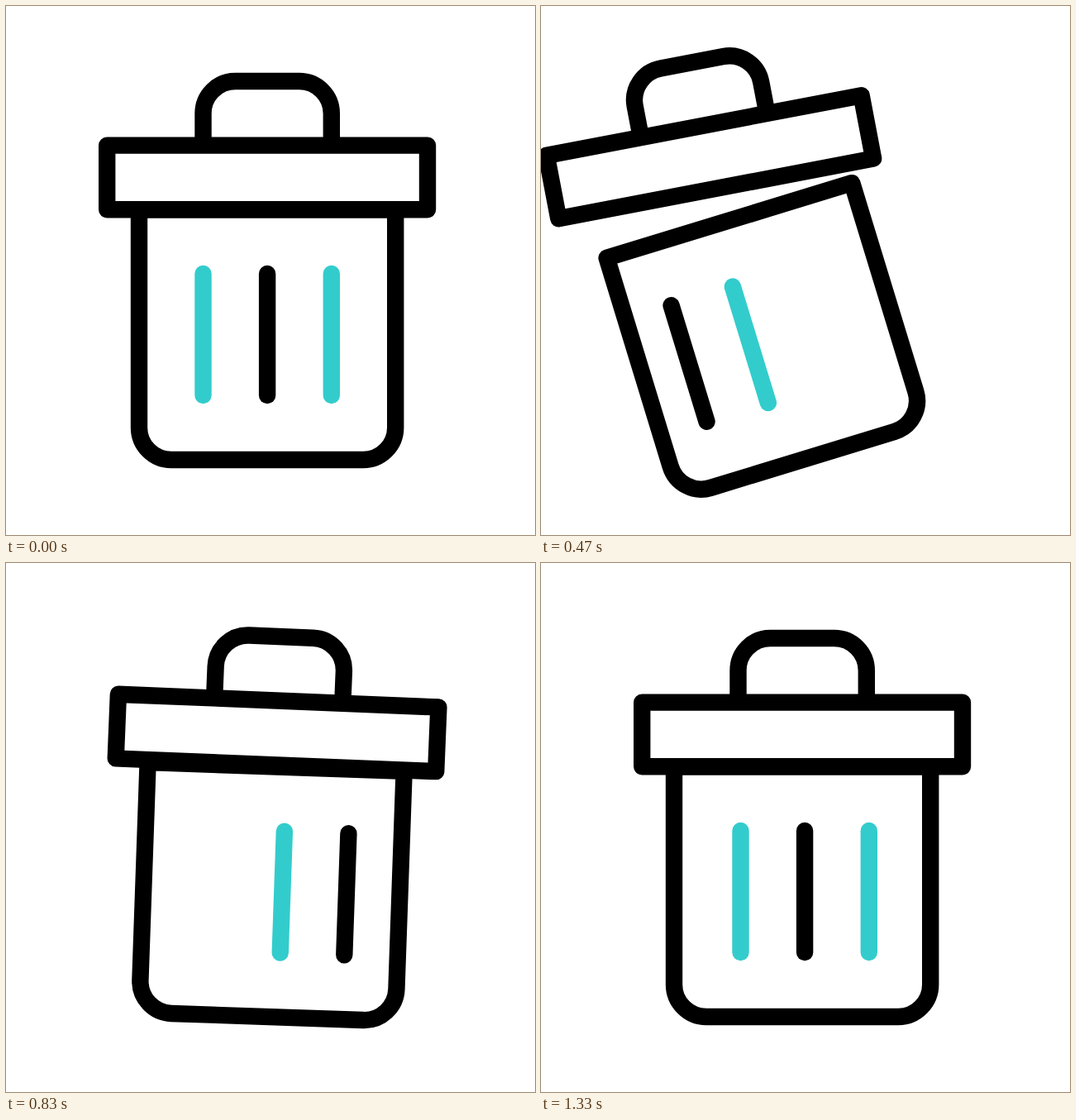
Animation, 640 px wide and 640 px high, one loop 2000 ms. Source, as an HTML page:

```html
<!DOCTYPE html>
<html lang="en">
<head>
<meta charset="utf-8">
<title>Shaking bin</title>
<style>
  html, body { margin: 0; width: 100%; height: 100%; overflow: hidden; background: #fff; }
  svg { display: block; width: 100%; height: 100%; }
  .ink { fill: none; stroke: #000; stroke-width: 20.4; stroke-linejoin: round; }
  .slat { stroke-linecap: round; }
  .teal { stroke: #3cc; }
</style>
</head>
<body>
<svg viewBox="0 0 640 640">
  <defs>
    <path id="shell" d="M161 246.3H471.2V510a39 39 0 0 1-39 39H200a39 39 0 0 1-39-39Z"/>
    <clipPath id="inside"><use href="#shell"/></clipPath>
    <g id="trio">
      <path class="ink slat teal" d="M238.5 324V471M393.8 324V471"/>
      <path class="ink slat" d="M316.1 324V471"/>
    </g>
  </defs>
  <g id="bin">
    <g clip-path="url(#inside)">
      <g id="slats">
        <use href="#trio"/>
        <use href="#trio" x="-393.6"/>
      </g>
    </g>
    <use href="#shell" class="ink"/>
    <g id="lid" class="ink">
      <path d="M238.5 168.5V130a39 39 0 0 1 39-39H354.8a39 39 0 0 1 39 39V168.5"/>
      <path d="M122.2 168.6H510V246.3H122.2Z"/>
    </g>
  </g>
</svg>
<script>
  const LOOP = 2000, LAST = 40;

  // Each key is [step, value]; 30 steps per second.
  const tilt = [[0, 0], [14, -17], [22, 8], [28, -4], [34, 2], [40, 0]];
  const open = [[9, 0], [17.5, 1], [26, 0]];
  const slide = [[0, 0], [14, -97.3], [40, 396.6]];

  const ease = x => (1 - Math.cos(Math.PI * x)) / 2;

  function valueAt(keys, step) {
    if (step <= keys[0][0]) return keys[0][1];
    for (let i = 1; i < keys.length; i++) {
      const [s0, v0] = keys[i - 1], [s1, v1] = keys[i];
      if (step <= s1) return v0 + (v1 - v0) * ease((step - s0) / (s1 - s0));
    }
    return keys[keys.length - 1][1];
  }

  const [bin, lid, slats] = ['bin', 'lid', 'slats'].map(id => document.getElementById(id));
  const move = (el, value) => el.setAttribute('transform', value);

  function draw(ms) {
    // Steps start on whole hundredths of a second.
    const step = Math.min(LAST, Math.floor((Math.floor(ms / 10) + 0.4) * 0.3));
    const lift = valueAt(open, step);
    move(bin, `rotate(${valueAt(tilt, step)} 316 548)`);
    move(lid, `translate(0 ${-65 * lift}) rotate(${9.75 * lift} 316 207.4)`);
    move(slats, `translate(${valueAt(slide, step)} 0)`);
  }

  function tick() {
    draw(performance.now() % LOOP);
    requestAnimationFrame(tick);
  }
  tick();
</script>
</body>
</html>
```
